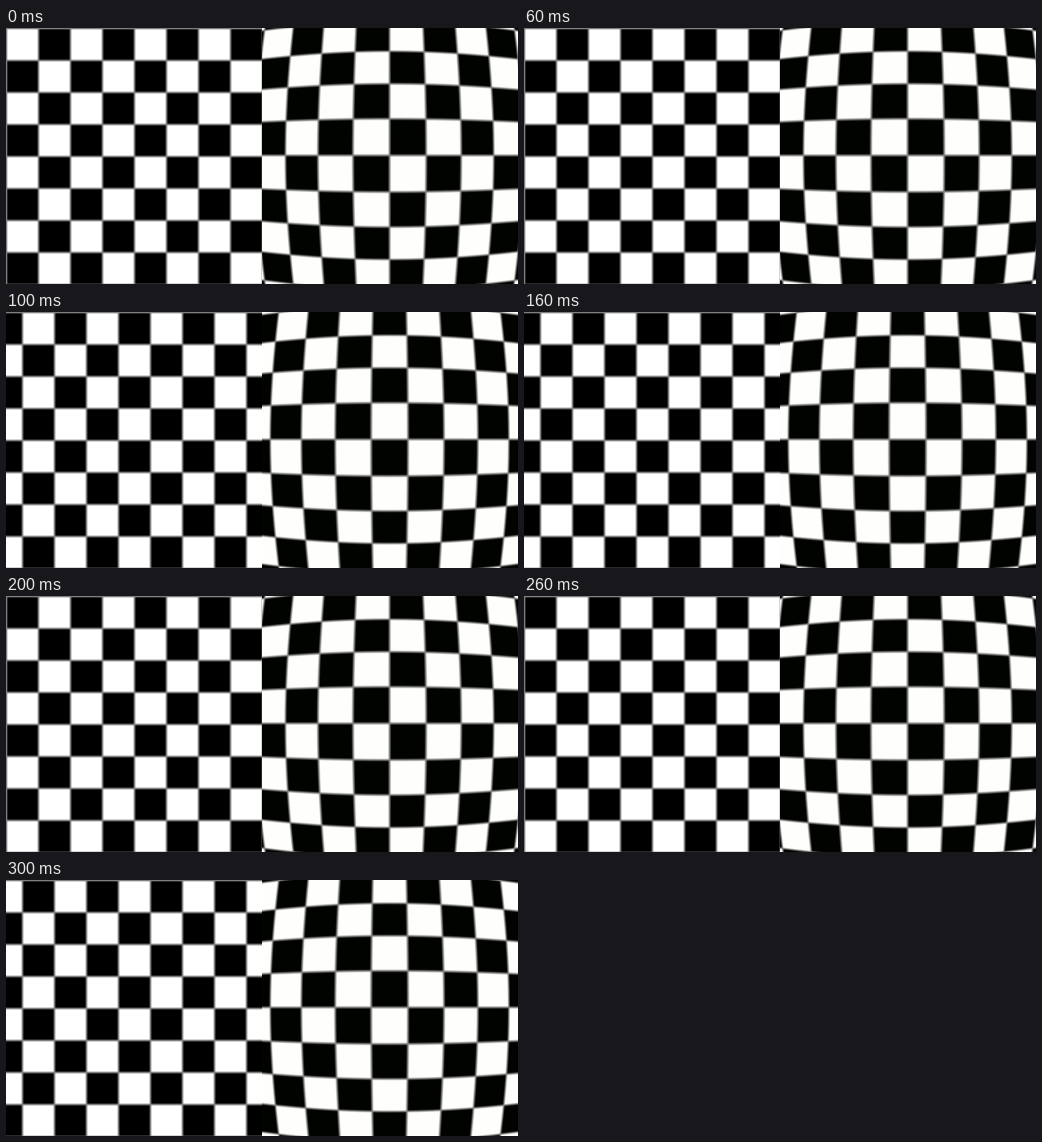
These frames come from a looping animation (512x256 px, 400 ms). An HTML page with a canvas:

```html
<!DOCTYPE html>
<html lang="en">
<head>
<meta charset="utf-8">
<title>Checkerboard and barrel lens</title>
<style>
  html, body { margin: 0; width: 100%; height: 100%; overflow: hidden; background: #fff; }
  canvas { display: block; width: 512px; height: 256px; }
</style>
</head>
<body>
<canvas width="512" height="256"></canvas>
<script>
const ctx = document.querySelector('canvas').getContext('2d');
const SIZE = 256, CELL = 32, SOFTNESS = 1.5, STEP_MS = 100, STEPS = 4, SAMPLES = 2;

// Alternates between -1 and 1 from cell to cell, with a short ramp at each edge
function stripes(x) {
  const toEdge = Math.asin(Math.sin(x * Math.PI / CELL)) * CELL / Math.PI;
  return Math.max(-1, Math.min(1, toEdge / SOFTNESS));
}

// 1 for white, 0 for black; the grid slides right by shift
const checker = (x, y, shift) => (1 + stripes(x - shift) * stripes(y)) / 2;

const flat = (x, y, shift) => checker(x - 0.5, y - 0.5, shift);

// Barrel lens: magnifies the middle
function lens(x, y, shift) {
  const dx = x - 127.6, dy = y - 127.4;
  const scale = 0.868 + 5e-6 * (dx * dx + dy * dy);
  return checker(dx * scale, dy * scale, shift);
}

function render(pattern, shift, black, white) {
  const image = ctx.createImageData(SIZE, SIZE);
  for (let y = 0, p = 0; y < SIZE; y++) {
    for (let x = 0; x < SIZE; x++, p += 4) {
      let light = 0;
      for (let s = 0; s < SAMPLES * SAMPLES; s++) {
        const sx = x + (s % SAMPLES + 0.5) / SAMPLES;
        const sy = y + (Math.floor(s / SAMPLES) + 0.5) / SAMPLES;
        light += pattern(sx, sy, shift);
      }
      light /= SAMPLES * SAMPLES;
      for (let c = 0; c < 3; c++) {
        image.data[p + c] = black[c] + (white[c] - black[c]) * light;
      }
      image.data[p + 3] = 255;
    }
  }
  return image;
}

const poses = Array.from({ length: STEPS }, (_, i) => {
  const shift = i * CELL / 2;
  return [
    render(flat, shift, [0, 0, 0], [255, 255, 255]),
    render(lens, shift, [1, 3, 1], [254, 254, 252])
  ];
});

let shown = -1;
function show(elapsed) {
  const step = Math.floor(elapsed / STEP_MS) % STEPS;
  if (step === shown) return;
  shown = step;
  poses[step].forEach((image, i) => ctx.putImageData(image, i * SIZE, 0));
}

show(0);
const start = performance.now();
function tick() {
  show(performance.now() - start);
  requestAnimationFrame(tick);
}
requestAnimationFrame(tick);
</script>
</body>
</html>
```
